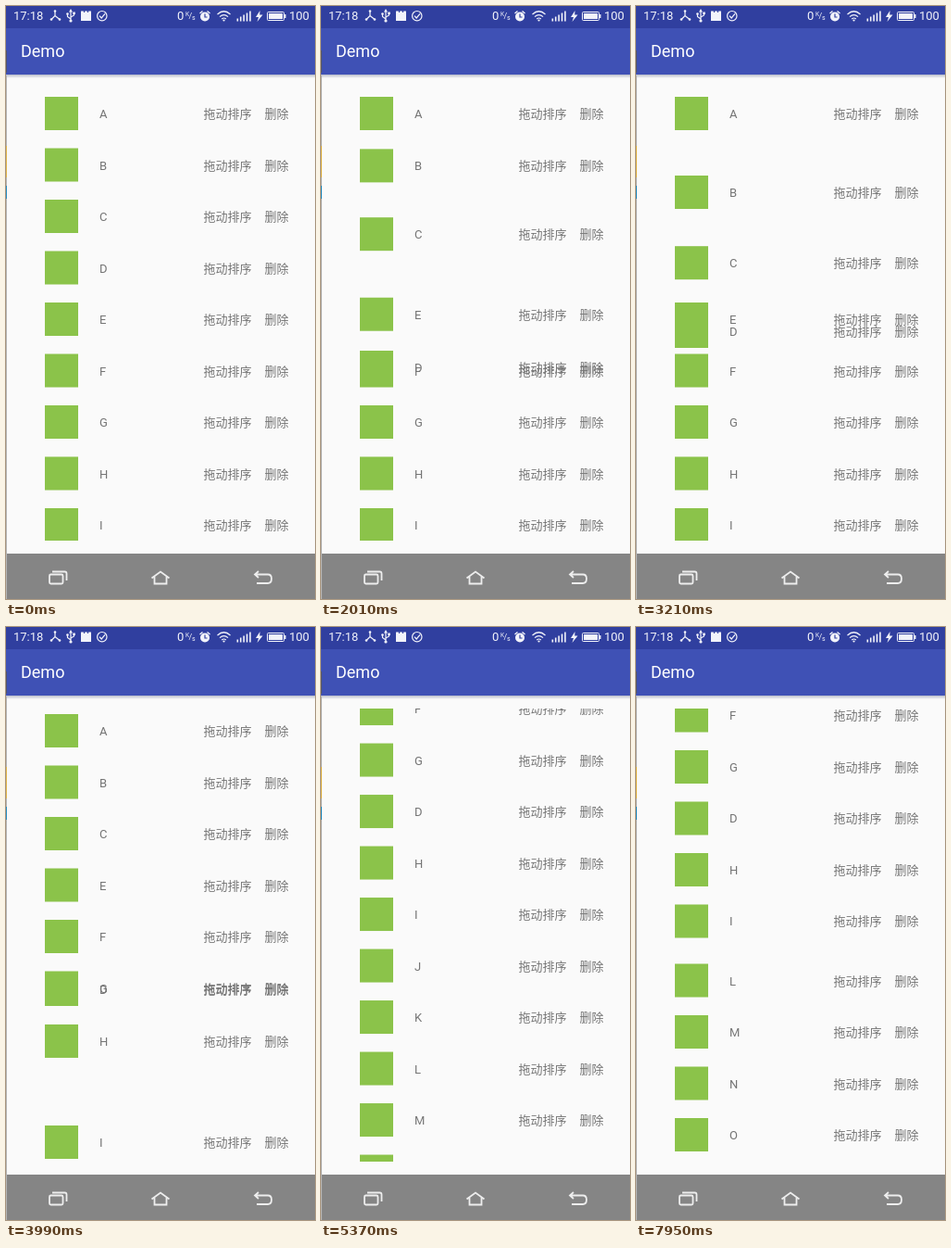
An HTML page with a canvas that plays this animation: 334x640 px, repeating every 8000 ms.

```html
<!DOCTYPE html>
<html lang="zh">
<head>
<meta charset="utf-8">
<title>Demo</title>
<style>
  html, body { margin: 0; width: 100%; height: 100%; overflow: hidden; background: #fafafa; }
  canvas { display: block; width: 334px; height: 640px; }
</style>
</head>
<body>
<canvas id="stage"></canvas>
<script>
const W = 334, H = 640, LOOP = 8000;
const PITCH = 55.5, FIRST = 117, LIST_TOP = 88, LIST_BOTTOM = 577;
const LATIN = 'Roboto, sans-serif';
const CJK = '"Noto Sans CJK SC", "Noto Sans CJK", sans-serif';

const canvas = document.getElementById('stage');
const ctx = canvas.getContext('2d');
const dpr = window.devicePixelRatio || 1;
canvas.width = W * dpr;
canvas.height = H * dpr;
ctx.scale(dpr, dpr);

const clamp = u => Math.max(0, Math.min(1, u));
const ease = u => (1 - Math.cos(Math.PI * clamp(u))) / 2;

// The screen refreshes in bursts: [first, last, count]
const bursts = [
  [1380, 2100, 8], [2220, 2970, 8], [3090, 3330, 3], [3420, 3780, 5],
  [3900, 4080, 3], [4200, 4590, 5], [4710, 4890, 3], [5190, 5460, 4],
  [5580, 5760, 3], [6150, 6480, 5], [6720, 6930, 3], [7140, 7650, 6], [7860, 7950, 2]
];
const refreshes = bursts.flatMap(([a, b, n]) =>
  Array.from({ length: n }, (_, i) => Math.round((a + (b - a) * i / (n - 1)) / 30) * 30));
const lastRefresh = t => refreshes.reduce((last, r) => r <= t ? r : last, 0);

// Finger path of the dragged row: [time, y]
const path = [
  [1330, 283.5], [1560, 157], [1860, 307], [2010, 391], [2230, 490], [2890, 160],
  [3210, 352], [3640, 554], [3740, 554], [3990, 392], [4330, 225], [4760, 457], [4890, 446]
];

function tangent(i) {
  if (i === 0 || i === path.length - 1) return 0;
  const [a, b, c] = path.slice(i - 1, i + 2);
  return (b[1] - a[1]) * (c[1] - b[1]) <= 0 ? 0 : (c[1] - a[1]) / (c[0] - a[0]);
}

function dragY(t) {
  if (t <= path[0][0]) return path[0][1];
  const i = path.findIndex(p => p[0] >= t);
  if (i < 0) return path[path.length - 1][1];
  const [t0, y0] = path[i - 1], [t1, y1] = path[i];
  const span = t1 - t0, u = (t - t0) / span, s = u * u * (3 - 2 * u);
  return y0 + (y1 - y0) * s +
    span * (tangent(i - 1) * u * (1 - u) ** 2 - tangent(i) * u * u * (1 - u));
}

const removal = t => [ease((t - 7040) / 250), ease((t - 7764) / 250)];
const edgeScroll = t => 4 * clamp((t - 3600) / 150);

function scrollY(t) {
  const [j, k] = removal(t);
  const fling = 316 * (1 - (1 - clamp((t - 5140) / 620)) ** 3.25);
  return edgeScroll(t) + fling - 30.5 * j - PITCH * k;
}

// Slot held by the dragged row, every 10 ms
const slots = [];
for (let t = 0, slot = 3; t <= 5300; t += 10) {
  const y = dragY(t) - FIRST + edgeScroll(t);
  while (y > (slot + 1) * PITCH) slot++;
  while (y < (slot - 1) * PITCH) slot--;
  slots.push(slot);
}

// How far row n has given way to the dragged row above it
function displaced(n, t) {
  const end = Math.round((Math.min(t, 5200) - 50) / 10);
  let below = 0;
  for (let i = 0; i < 25; i++) if (slots[Math.max(0, end - i)] <= n) below++;
  return ease(below / 25);
}

function text(str, x, y, size, color, font = LATIN) {
  ctx.font = `${size}px ${font}`;
  ctx.fillStyle = color;
  ctx.fillText(str, x, y);
}

function rect(x, y, w, h, color) {
  ctx.fillStyle = color;
  ctx.fillRect(x, y, w, h);
}

function stroke(d, color, width = 1.2) {
  ctx.strokeStyle = color;
  ctx.lineWidth = width;
  ctx.stroke(new Path2D(d));
}

function fill(d, color) {
  ctx.fillStyle = color;
  ctx.fill(new Path2D(d));
}

function dot(x, y, r, color) {
  ctx.fillStyle = color;
  ctx.beginPath();
  ctx.arc(x, y, r, 0, 7);
  ctx.fill();
}

function drawRow(letter, y, x = 0) {
  if (y < LIST_TOP - 30 || y > LIST_BOTTOM + 30) return;
  rect(42 + x, y - 19, 36, 36, '#8bc34a');
  text(letter, 101 + x, y + 4, 13, '#757575');
  text('拖动排序', 213.5 + x, y + 4, 13, '#757575', CJK);
  text('删除', 279.5 + x, y + 4, 13, '#757575', CJK);
}

function drawList(t) {
  const scroll = scrollY(t), [j, k] = removal(t);
  ctx.save();
  ctx.beginPath();
  ctx.rect(0, LIST_TOP, W, LIST_BOTTOM - LIST_TOP);
  ctx.clip();
  [...'ABCEFGHIJKLMNO'].forEach((letter, n) => {
    let x = 0, y = FIRST + PITCH * (n + displaced(n, t)) - scroll;
    if (letter > 'J') y -= PITCH * j;
    if (letter > 'K') y -= PITCH * k;
    if (letter === 'J' && t > 6100 && t < 6480) y += 2.5 * Math.sin((t - 6100) / 380 * 2 * Math.PI);
    const swipe = { J: 6690, K: 7410 }[letter];
    if (swipe) {
      if (t >= swipe + 210) return;
      x = -27 * clamp((t - swipe) / 150);
    }
    drawRow(letter, y, x);
  });
  drawRow('D', t < 5000 ? dragY(t) : FIRST + 6 * PITCH - scroll);
  ctx.restore();
}

function drawStatusBar() {
  const c = '#f2f3fa', bg = '#303f9f';
  rect(0, 0, W, 24, bg);
  text('17:18', 8, 15, 13, c);
  stroke('M53 5.5V10.5L49 14.5M53 10.5L58 14.5', c);
  [[53, 5.5], [49, 14.5], [58, 14.5]].forEach(([x, y]) => dot(x, y, 1.3, c));
  stroke('M70 5V16M70 14L66.5 11.5V8.5M70 12L73.5 10V7', c);
  fill('M70 3L72 6.5H68Z', c);
  dot(70, 16, 1.6, c);
  dot(66.5, 8.5, 1.3, c);
  rect(72.3, 6.5, 2.5, 2.5, c);
  rect(81, 7, 11, 9, c);
  [81, 85, 89].forEach(x => rect(x, 5.5, 3, 1.5, c));
  stroke('M109 10.7A5.2 5.2 0 1 1 98.6 10.7A5.2 5.2 0 1 1 109 10.7M101 10.7L103.2 13L107 8.4', c);

  text('0', 185, 15, 13, c);
  text('K', 194, 10.5, 6.5, c);
  text('/', 197.5, 14, 9, c);
  text('s', 201, 14.5, 7, c);
  dot(215, 11.5, 5, c);
  stroke('M209.5 8L212.5 5.5M217.5 5.5L220.5 8', c, 1.4);
  stroke('M215 8.5V12H217.5', bg);
  stroke('M228.5 9Q235.5 2.5 242.5 9M231 11.6Q235.5 7.5 240 11.6M233.2 14Q235.5 12 237.8 14', c);
  dot(235.5, 15.5, 1.1, c);
  for (let i = 0; i < 5; i++) rect(249.5 + 3.4 * i, 13.5 - 2 * i, 1.6, 3 + 2 * i, c);
  fill('M274.5 5L270 12H273L271.5 17L277.5 9.5H274.2Z', c);
  stroke('M283.5 6.5H299.5Q300.5 6.5 300.5 7.5V14.5Q300.5 15.5 299.5 15.5H283.5Q282.5 15.5 282.5 14.5V7.5Q282.5 6.5 283.5 6.5Z', c, 1);
  rect(284, 8, 15, 6, c);
  rect(301, 9, 1.5, 4, c);
  text('100', 306, 15, 13, c);
}

function drawNavBar() {
  const c = '#ededed';
  rect(0, 591, W, 49, '#858585');
  stroke('M48 613.5H60Q61.5 613.5 61.5 615V622Q61.5 623.5 60 623.5H48.5Q47 623.5 47 622V615Q47 613.5 48.5 613.5M50 610.5H63.5Q65.5 610.5 65.5 612.5V620', c, 1.8);
  stroke('M157.5 617.5L167 610.5L176.5 617.5M160.5 616V623.5H173.5V616', c, 1.8);
  stroke('M273 610L269 613.5L273 617M269.5 613.5H283Q287 613.5 287 618Q287 623 283 623H271', c, 1.8);
}

function drawChrome() {
  drawStatusBar();
  rect(0, 24, W, 50, '#3f51b5');
  text('Demo', 16, 55, 18, '#fff');
  const shadow = ctx.createLinearGradient(0, 74, 0, 78);
  shadow.addColorStop(0, '#b9bdca');
  shadow.addColorStop(1, '#fafafa');
  rect(0, 74, W, 4, shadow);
  drawNavBar();
  rect(0, 75, 1, 565, '#b4b4b4');
  rect(0, 48, 1, 24, '#50536a');
  rect(0, 151, 1, 34, '#e0b64c');
  rect(0, 194, 1, 14, '#2a8fc4');
}

function frame(now) {
  rect(0, 0, W, H, '#fafafa');
  drawList(lastRefresh(now % LOOP));
  drawChrome();
  requestAnimationFrame(frame);
}
requestAnimationFrame(frame);
</script>
</body>
</html>
```
